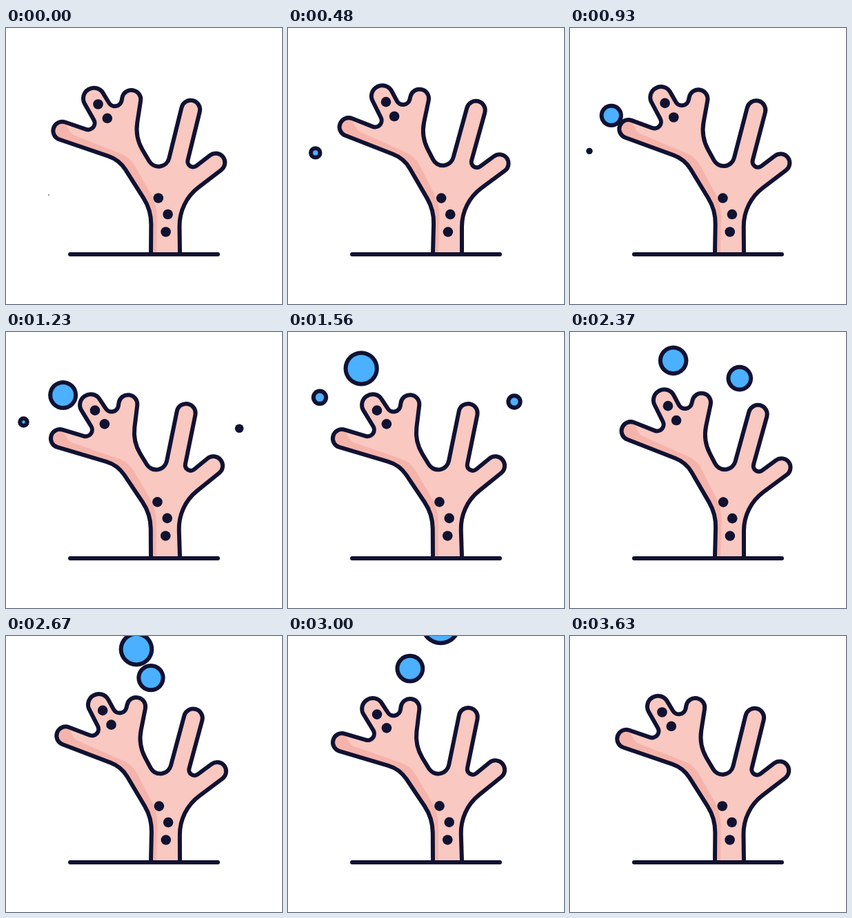
An HTML page with a canvas for the animation above (5750 ms loop, 400 by 400 pixels).

```html
<!DOCTYPE html>
<html lang="en">
<head>
<meta charset="utf-8">
<title>Coral</title>
<style>
  html, body { margin: 0; width: 100%; height: 100%; overflow: hidden; background: #fff; }
  canvas { display: block; width: 400px; height: 400px; }
</style>
</head>
<body>
<canvas id="stage" width="400" height="400"></canvas>
<script>
const ctx = document.getElementById('stage').getContext('2d');
const INK = '#111232', PINK = '#f8c8c1', SHADE = '#f5b4ab', BLUE = '#4bb0ff';
const LOOP = 5750, MOVE_END = 3630, STEP = 30, SWAY = 1800, GROUND = 326;
const TAU = Math.PI * 2, LINE = 6;

// A round-ended limb: the two corners of its tip, rounded by its half width.
function limb(x, y, r, degrees) {
  return [-45, 45].map(turn => {
    const a = (degrees + turn) * TAU / 360, reach = r * Math.SQRT2;
    return [x + reach * Math.cos(a), y + reach * Math.sin(a), r];
  });
}

// Corners as [x, y, rounding], clockwise from the foot of the trunk.
const CORAL = [
  [210, GROUND, 0], [210.5, 264, 70], [164, 191, 48],
  ...limb(81.5, 149, 13.2, 198.8), [139.7, 155, 9.5],
  ...limb(127.5, 102, 15.2, 239), [162.7, 130.7, 10],
  ...limb(181.5, 103.3, 13.3, 281), [187, 158, 60], [227, 226.5, 15.8],
  ...limb(267.6, 118.3, 13.5, 284), [258, 213.8, 8],
  ...limb(304, 195, 13.3, 322.3), [251, 252.6, 70], [252, GROUND, 0]
];
const SHADOW = [
  [218, GROUND, 0], [219, 257, 70], [180, 187.5, 40], [95, 154, 12],
  [84, 135, 0], [50, 160, 0], [190, GROUND, 0]
];
const SPOTS = [[133.5, 110.5], [146.8, 130.8], [220.8, 246.5], [234.6, 270], [231.6, 295.5]];

// Bubbles rise along cubic curves; growth bends how fast they reach full size.
const BUBBLES = [
  { start: 0, span: 2220, size: 30, growth: 1.45, x: [62, -22, 160, 110], y: [242, 144, 66, -27] },
  { start: 600, span: 2700, size: 32, growth: 1, x: [62, -82, 226, 234], y: [254, 9, 105, -63] },
  { start: 960, span: 2700, size: 21, growth: 2.9, x: [329, 390, 123, 157], y: [190, -10, 138, -28] }
];

const cubic = ([a, b, c, d], u) => {
  const v = 1 - u;
  return v * v * v * a + 3 * v * v * u * b + 3 * v * u * u * c + u * u * u * d;
};

// A swing that lingers at both ends and passes through rest once per period.
function swing(t) {
  const lag = TAU * .025;
  return Math.tanh(2.5 * (Math.sin(TAU * t / SWAY - lag) + Math.sin(lag)));
}

// Leans points sideways more the higher they are, and tilts them about the trunk.
function makeBend(t) {
  const w = swing(t), size = Math.abs(w);
  const left = 6.6 * w + 1.8 * size, right = 6 * w - 1.2 * size;
  return (x, y) => {
    const h = GROUND - y;
    const side = Math.min(1, Math.max(0, (x - 195) / 40));
    const lean = left + (right - left) * side;
    const tilt = (x < 210 ? .044 : .017) * Math.min(1, h / 150);
    return [x + lean * (h / 213) ** 1.5, y + w * tilt * (x - 210)];
  };
}

function trace(corners, bend) {
  const path = new Path2D();
  const points = corners.map(([x, y, r]) => [...bend(x, y), r]);
  points.forEach(([x, y, r], i) => {
    if (i === 0) path.moveTo(x, y);
    else if (r) path.arcTo(x, y, points[i + 1][0], points[i + 1][1], r);
    else path.lineTo(x, y);
  });
  return path;
}

function disc(x, y, r, color) {
  ctx.fillStyle = color;
  ctx.beginPath();
  ctx.arc(x, y, r, 0, TAU);
  ctx.fill();
}

function drawCoral(t) {
  const bend = makeBend(t), outline = trace(CORAL, bend);
  ctx.save();
  ctx.clip(outline);
  ctx.fillStyle = PINK;
  ctx.fillRect(0, 0, 400, 400);
  ctx.fillStyle = SHADE;
  ctx.fill(trace(SHADOW, bend));
  ctx.restore();

  ctx.strokeStyle = INK;
  ctx.lineWidth = LINE;
  ctx.lineJoin = 'round';
  ctx.lineCap = 'butt';
  ctx.stroke(outline);
  for (const [x, y] of SPOTS) disc(...bend(x, y), 7.3, INK);

  ctx.lineCap = 'round';
  ctx.beginPath();
  ctx.moveTo(93, 328);
  ctx.lineTo(307, 328);
  ctx.stroke();
}

function drawBubbles(t) {
  for (const { start, span, size, growth, x, y } of BUBBLES) {
    const u = (t - start) / span;
    if (u < 0 || u > 1) continue;
    const r = .8 + size * (1 - (1 - u) ** growth);
    const at = [cubic(x, u), cubic(y, u)];
    disc(...at, r, INK);
    if (r > LINE) disc(...at, r - LINE, BLUE);
  }
}

function frame(now) {
  const t = Math.min(MOVE_END, Math.floor(now % LOOP / STEP) * STEP);
  ctx.clearRect(0, 0, 400, 400);
  drawCoral(Math.min(t, 2 * SWAY));
  if (t < MOVE_END) drawBubbles(t);
}

const start = performance.now();
function tick() {
  frame(performance.now() - start);
  requestAnimationFrame(tick);
}
tick();
</script>
</body>
</html>
```
